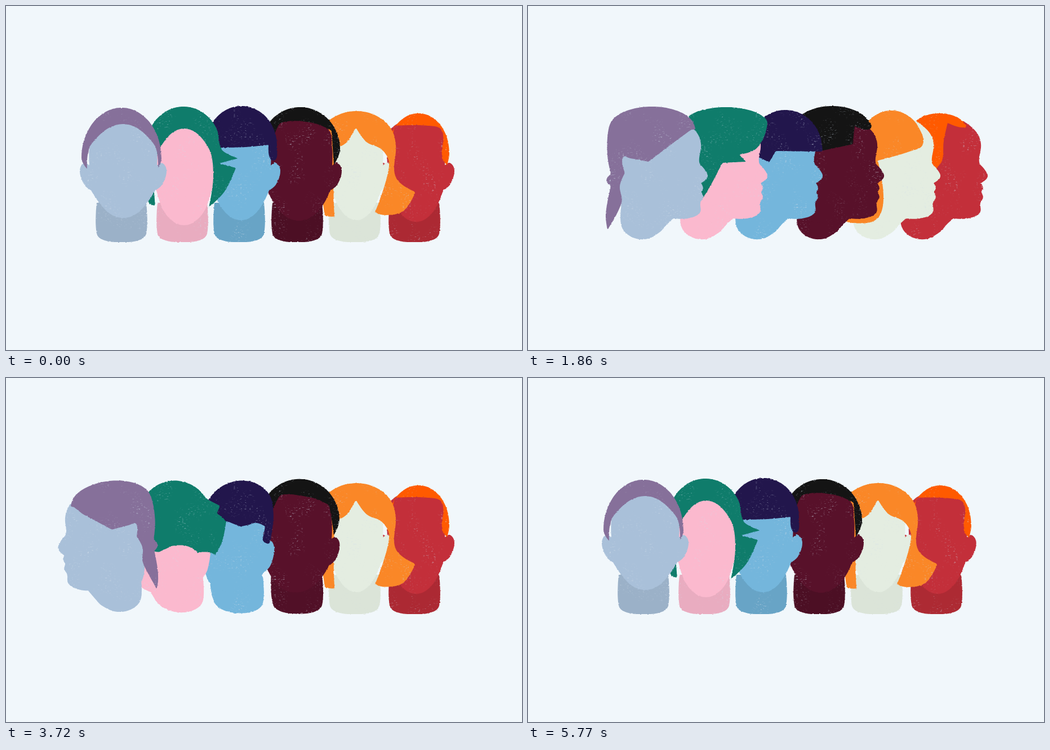
An HTML page that plays this animation: 916x612 px, repeating every 5850 ms.

```html
<!DOCTYPE html>
<html lang="en">
<head>
<meta charset="utf-8">
<title>Turning heads</title>
<style>
html, body { margin: 0; width: 100%; height: 100%; overflow: hidden; background: #f1f7fb; }
svg { display: block; width: 100%; height: 100%; }
</style>
</head>
<body>
<svg viewBox="0 0 916 612">
  <filter id="chalk" filterUnits="userSpaceOnUse" x="70" y="165" width="760" height="270" color-interpolation-filters="sRGB">
    <feTurbulence type="fractalNoise" baseFrequency=".25 .4" numOctaves="2" seed="4"/>
    <feColorMatrix values="1 0 0 0 0  0 1 0 0 0  0 0 1 0 0  0 0 0 0 1" result="grain"/>
    <feDisplacementMap in="SourceGraphic" in2="grain" scale="2.5" xChannelSelector="R" yChannelSelector="G" result="shape"/>
    <feColorMatrix in="grain" values="0 0 0 0 .82  0 0 0 0 .87  0 0 0 0 .92  2.5 0 0 0 -1.55" result="specks"/>
    <feTurbulence type="fractalNoise" baseFrequency=".03 .02" numOctaves="2" seed="9"/>
    <feColorMatrix values="0 0 0 0 1  0 0 0 0 1  0 0 0 0 1  4 0 0 0 -1.9" result="patches"/>
    <feComposite in="specks" in2="patches" operator="in"/>
    <feComposite in2="shape" operator="atop"/>
  </filter>
  <g id="heads" filter="url(#chalk)"></g>
</svg>
<script>
const LOOP = 5850, SAMPLES = 180, DOME = 7;
const clamp = v => Math.max(0, Math.min(1, v));
const mix = (a, b, t) => a + (b - a) * t;
const smooth = t => t * t * (3 - 2 * t);

// "x y" pairs; "!" marks a sharp corner
const points = text => text.split(',').map(s => {
  const [x, y] = s.replace('!', '').split(' ').map(Number);
  return { x, y, sharp: s.endsWith('!') };
});
const shift = (pts, dx) => pts.map(p => ({ ...p, x: p.x + dx }));

// Mirror about x = sum / 2, still clockwise and still beginning with the first `lead` points.
const mirror = (pts, sum = 0, lead = 1) => {
  const m = pts.map(p => ({ ...p, x: sum - p.x }));
  return [...m.slice(0, lead).reverse(), ...m.slice(lead).reverse()];
};

// Elliptic crown from left to right, then the lower edge from right to left.
function hair(x, top, rx, ry, edge) {
  const dome = Array.from({ length: DOME }, (_, i) => {
    const a = Math.PI * i / (DOME - 1);
    return { x: x - rx * Math.cos(a), y: top + ry * (1 - Math.sin(a)) };
  });
  return [...dome, ...points(edge)];
}

const FRONT_NECK = points('0 420,-30 417,-44 405,-44 350!,44 350!,44 405,30 417');
const SIDE_NECK = points('-112 415,-140 408,-154 388,-152 345!,-45 345!,-60 377!,-72 388,-86 403');
const PROFILE = points('-105 198,-50 203,-22 222,-12 245,-15 278,-6 290,0 304,-12 315!,-8 324,-12 331!,-8 340,-13 350,-14 368,-36 378,-60 378!,-140 380,-156 330,-162 275,-150 225');

function frontFace(width, chin) {
  const a = width / 2;
  const side = points([
    [a * .85, 217], [a, 253], [a, '284!'], [a + 9, 279], [a + 17, 293], [a + 9, 318], [a - 3, '328!'],
    [a * .72, chin - 28], [a * .38, chin - 7]
  ].map(p => p.join(' ')).join());
  return [{ x: 0, y: 203 }, ...side, { x: 0, y: chin }, ...mirror(side, 0, 0)];
}

const facing = (x, width, chin, locks) =>
  [shift(FRONT_NECK, x - 3), shift(frontFace(width, chin), x), locks];
// nose: x of the nose tip
const toRight = (nose, locks) => [shift(SIDE_NECK, nose), shift(PROFILE, nose), locks];
const toLeft = (nose, locks) => [shift(mirror(SIDE_NECK), nose), shift(mirror(PROFILE), nose), locks];

const plait = hair(220, 179, 77, 40, '290 220,214 277!,182 271,168 269,172 297!,163 320,166 350,141 398!,138 370,147 320!,139 310,147 299!,141 265');

const HEADS = [
  {
    skin: [169, 192, 217], shade: .92, hair: '#86709a',
    front: facing(208, 120, 377, hair(205, 181, 71, 90, '270 288!,262 245,208 210,152 245,144 290!')),
    right: toRight(319, plait),
    left: toLeft(84, mirror(plait, 408, DOME))
  },
  {
    skin: [251, 185, 206], shade: .93, hair: '#0f7c6b',
    front: facing(316, 104, 390, hair(315, 179, 67, 75, '397 265,412 271!,378 280!,408 288!,388 330,360 358!,368 300,357 248,316 218,276 248,263 300,265 355!,253 350')),
    right: toRight(425, hair(351, 180, 74, 30, '406 253,375 264!,387 277!,345 279!,318 330,296 360!,280 300')),
    left: toLeft(191, hair(304, 180, 76, 60, '378 290,344 371!,313 325,298 312,277 278!,255 279!'))
  },
  {
    skin: [116, 182, 220], shade: .9, hair: '#22164c',
    front: facing(417, 106, 381, hair(418, 178, 63, 70, '474 275,466 247!,425 251,375 252!')),
    right: toRight(523, hair(457, 185, 66, 72, '518 259!,440 258!,428 278!,412 270!')),
    left: toLeft(299, hair(417, 186, 72, 55, '474 276,442 341!,430 324!,447 300,440 275,423 284,408 290!,390 262!,360 262!'))
  },
  {
    skin: [88, 17, 42], shade: .86, hair: '#141414',
    front: facing(520, 118, 382, hair(522, 180, 71, 75, '582 283!,578 222!,545 208,490 207,478 225!')),
    right: toRight(632, hair(540, 178, 68, 40, '580 214!,576 246!,524 257!,495 250')),
    left: toLeft(410, hair(514, 178, 69, 55, '577 273!,497 239!,490 208!'))
  },
  {
    skin: [228, 237, 225], shade: .96, hair: '#fa8727',
    front: facing(622, 94, 381, hair(622, 187, 70, 60, '692 305,727 331!,705 365,672 372,655 367!,680 285,668 256,640 242,621 216!,605 242,585 260,583 375!,566 374!')),
    right: toRight(732, hair(645, 186, 56, 60, '680 258,621 275!,631 345,615 382,565 384!,570 320')),
    left: toLeft(508, hair(620, 187, 66, 80, '690 308,707 312!,700 350,680 380,645 383,615 365,610 335,630 295,612 270,575 268'))
  },
  {
    skin: [195, 47, 58], shade: .88, hair: '#ff5a00',
    front: facing(728, 102, 384, hair(732, 191, 55, 70, '783 283!,774 270,774 222,750 213,690 213!')),
    right: toRight(816, hair(730, 191, 46, 25, '745 208!,738 240,735 275,722 291!,704 250')),
    left: toLeft(623, hair(726, 191, 61, 75, '782 310,771 352!,758 335,760 285,735 293,705 278,697 225,680 208!'))
  }
];

// Heads follow one another by `lag`; `lead` is how far a turn has run at its first step.
const TURNS = [
  { at: 420, side: 'right', span: 800, lag: 48, tick: 80, lead: 80 },
  { at: 1860, side: 'right', span: 760, lag: 48, tick: 80, lead: 0, back: true },
  { at: 3280, side: 'left', span: 600, lag: 104, tick: 40, lead: 0 },
  { at: 4770, side: 'left', span: 540, lag: 100, tick: 40, lead: 0, back: true }
];

// Smooth closed curve through the points, resampled at even distances.
function outline(pts) {
  const n = pts.length;
  const tangents = pts.map((p, i) => {
    if (p.sharp) return { x: 0, y: 0 };
    const a = pts[(i + n - 1) % n], b = pts[(i + 1) % n];
    const len = Math.hypot(b.x - a.x, b.y - a.y) || 1;
    return { x: (b.x - a.x) / len, y: (b.y - a.y) / len };
  });
  const line = [];
  pts.forEach((a, i) => {
    const j = (i + 1) % n, b = pts[j];
    const h = Math.hypot(b.x - a.x, b.y - a.y) * .36;
    const cubic = (k, t) => {
      const u = 1 - t;
      return u * u * u * a[k] + 3 * u * u * t * (a[k] + tangents[i][k] * h)
        + 3 * u * t * t * (b[k] - tangents[j][k] * h) + t * t * t * b[k];
    };
    for (let s = 0; s < 10; s++) line.push([cubic('x', s / 10), cubic('y', s / 10)]);
  });
  line.push(line[0]);

  const dist = [0];
  for (let i = 1; i < line.length; i++) {
    dist.push(dist[i - 1] + Math.hypot(line[i][0] - line[i - 1][0], line[i][1] - line[i - 1][1]));
  }
  const total = dist[dist.length - 1], even = [];
  for (let s = 0, i = 1; s < SAMPLES; s++) {
    const d = total * s / SAMPLES;
    while (dist[i] < d) i++;
    const t = (d - dist[i - 1]) / (dist[i] - dist[i - 1] || 1);
    even.push([mix(line[i - 1][0], line[i][0], t), mix(line[i - 1][1], line[i][1], t)]);
  }
  return even;
}

const root = document.getElementById('heads');
for (const head of [...HEADS].reverse()) {
  for (const pose of ['front', 'right', 'left']) head[pose] = head[pose].map(outline);
  head.paths = ['none', `rgb(${head.skin})`, head.hair].map(fill => {
    const path = document.createElementNS('http://www.w3.org/2000/svg', 'path');
    path.setAttribute('fill', fill);
    return root.appendChild(path);
  });
}

function drawHead(head, side, p) {
  head.paths.forEach((path, k) => {
    const pts = head.front[k].map(([x, y], j) =>
      mix(x, head[side][k][j][0], p).toFixed(1) + ' ' + mix(y, head[side][k][j][1], p).toFixed(1));
    path.setAttribute('d', 'M' + pts.join('L') + 'Z');
  });
  const shade = mix(head.shade, 1, clamp(p * 4));
  head.paths[0].setAttribute('fill', `rgb(${head.skin.map(c => Math.round(c * shade))})`);
}

let shown = '';
function render(time) {
  const turn = TURNS.filter(u => u.at <= time).pop() || { ...TURNS[0], lead: 0 };
  const { at, side, span, lag, tick, lead, back } = turn;
  const run = Math.floor((time - at) / tick) * tick + lead;
  const progress = HEADS.map((_, i) => {
    const p = smooth(clamp((run - i * lag) / span));
    return back ? 1 - p : p;
  });
  const state = side + progress;
  if (state === shown) return;
  shown = state;
  HEADS.forEach((head, i) => drawHead(head, side, progress[i]));
}

const start = performance.now();
function loop() {
  render((performance.now() - start) % LOOP);
  requestAnimationFrame(loop);
}
loop();
</script>
</body>
</html>
```
